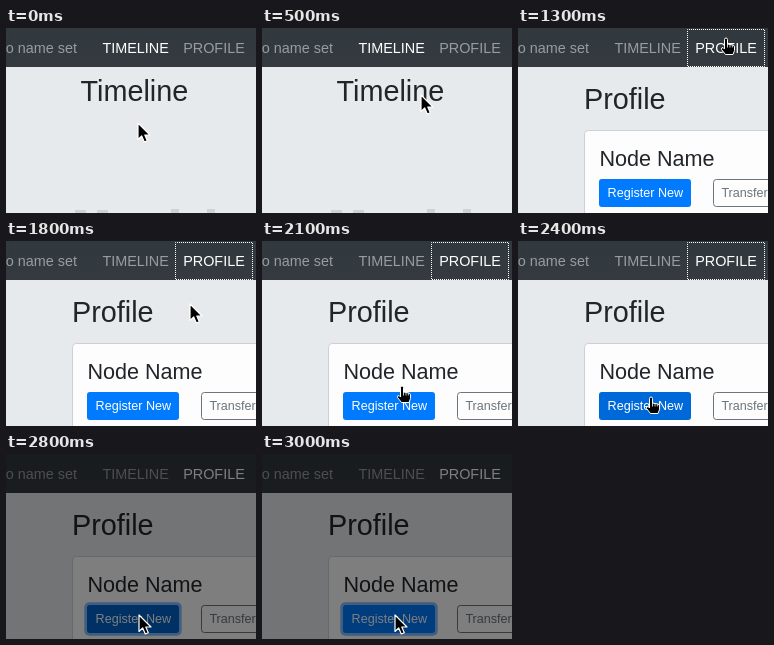
Recreate the animation shown at these times as an HTML page. Size 250 by 185 pixels, loop 8 s.

```html
<!DOCTYPE html>
<html lang="en">
<head>
<meta charset="utf-8">
<title>Profile</title>
<style>
html, body { margin: 0; width: 100%; height: 100%; overflow: hidden; background: #e6eaed; }
svg { display: block; width: 250px; height: 185px; font-family: "Liberation Sans", Arial, sans-serif; }
.nav { font-size: 14.4px; fill: #fff; }
.title { font-size: 28.8px; fill: #212529; }
.card { font-size: 21.6px; fill: #212529; }
.button { font-size: 12.6px; }
.cursor { fill: #000; stroke: #fff; stroke-linejoin: round; }
</style>
</head>
<body>
<svg viewBox="0 0 250 185">
  <defs>
    <linearGradient id="bar" x2="0" y2="1">
      <stop stop-color="#31383e"/><stop offset="1" stop-color="#343a40"/>
    </linearGradient>
  </defs>
  <rect width="250" height="185" fill="#e6eaed"/>
  <rect width="250" height="39" fill="url(#bar)"/>
  <g class="nav">
    <text x="71" y="25" text-anchor="end" fill-opacity=".5">No name set</text>
    <text id="timelineLink" x="96.4" y="25">TIMELINE</text>
    <text id="profileLink" x="177.2" y="25">PROFILE</text>
  </g>
  <rect id="outline" x="169.5" y="1.5" width="77" height="37" fill="none" stroke="#fff" stroke-dasharray="1 1" stroke-dashoffset=".5"/>

  <g id="timelinePage">
    <text class="title" x="74.5" y="73">Timeline</text>
    <path d="M69 182h11v3h-11zM91 182h11v3h-11zM165 181h8v4h-8zM201 181h8v4h-8z" fill="#ced2d6"/>
  </g>

  <g id="profilePage">
    <text class="title" x="66" y="81">Profile</text>
    <rect x="66.5" y="102.5" width="220" height="120" rx="3.6" fill="#fdfdfe" stroke="#ced1d4"/>
    <text class="card" x="81.4" y="138">Node Name</text>
    <rect id="ring" x="78.3" y="148.3" width="97.4" height="33.4" rx="5" fill="#80bdff"/>
    <rect id="register" x="81" y="151" width="92" height="28" rx="2.9"/>
    <text class="button" x="89.6" y="169" fill="#fff">Register New</text>
    <rect x="195.5" y="151.5" width="100" height="27" rx="2.9" fill="none" stroke="#6c757d"/>
    <text class="button" x="203.4" y="169" fill="#6c757d">Transfer</text>
  </g>

  <rect id="backdrop" width="250" height="185"/>
  <path id="arrow" class="cursor" stroke-width="1.2" d="M0 0V16.5L3.7 13L6.3 19L9.3 17.7L6.8 12H12Z"/>
  <g id="hand" class="cursor">
    <path d="M-1.5 6V-3.5Q-1.5 -5 0 -5T1.5 -3.5V1L7 2Q8.5 2.5 8.5 4V7.5L7 11.5H-.5L-4.5 6.5Q-5 4.5 -3 4.5Z"/>
    <path d="M1.5 1V4.5M4 1.5V4.5M6.3 2V4.5" stroke-width=".8"/>
  </g>
</svg>
<script>
const el = Object.fromEntries([...document.querySelectorAll("[id]")].map(e => [e.id, e]));
const show = (e, on) => e.setAttribute("visibility", on ? "visible" : "hidden");
const clamp = v => Math.max(0, Math.min(1, v));
const smooth = v => v * v * (3 - 2 * v);
const mix = (a, b, p) => a + (b - a) * p;

// Pointer stops: time, x, y
const stops = [[300, 132, 95], [800, 208, 15], [1600, 208, 15], [2100, 140, 150], [2400, 133, 161]];

function pointer(t) {
  let [, x, y] = stops[0];
  for (let i = 1; i < stops.length; i++) {
    const [from] = stops[i - 1], [to, nx, ny] = stops[i];
    const p = smooth(clamp((t - from) / (to - from)));
    x = mix(x, nx, p);
    y = mix(y, ny, p);
  }
  return [x, y];
}

function render(t) {
  const [x, y] = pointer(t);
  const onLink = x > 169 && y < 38;
  const onButton = t >= 2100 && t < 2700;
  const profile = t >= 1300;

  show(el.timelinePage, !profile);
  show(el.profilePage, profile);
  show(el.outline, t >= 1200 && t < 2600);
  show(el.ring, t >= 2600);
  el.timelineLink.setAttribute("fill-opacity", profile ? .5 : 1);
  el.profileLink.setAttribute("fill-opacity", profile ? 1 : onLink ? .75 : .5);
  el.register.setAttribute("fill",
    t < 2200 || t >= 2900 ? "#007bff" : t < 2600 ? "#0069d9" : "#0062cc");
  el.backdrop.setAttribute("opacity", .5 * clamp((t - 2700) / 100));

  const hand = onLink || onButton;
  show(el.hand, hand);
  show(el.arrow, !hand);
  const place = `translate(${Math.round(x)} ${Math.round(y)})`;
  el.hand.setAttribute("transform", place);
  el.arrow.setAttribute("transform", place);
}

const start = performance.now();
function tick() {
  const t = (performance.now() - start) % 8000;
  render(Math.floor(t / 100) * 100);
  requestAnimationFrame(tick);
}
tick();
</script>
</body>
</html>
```
